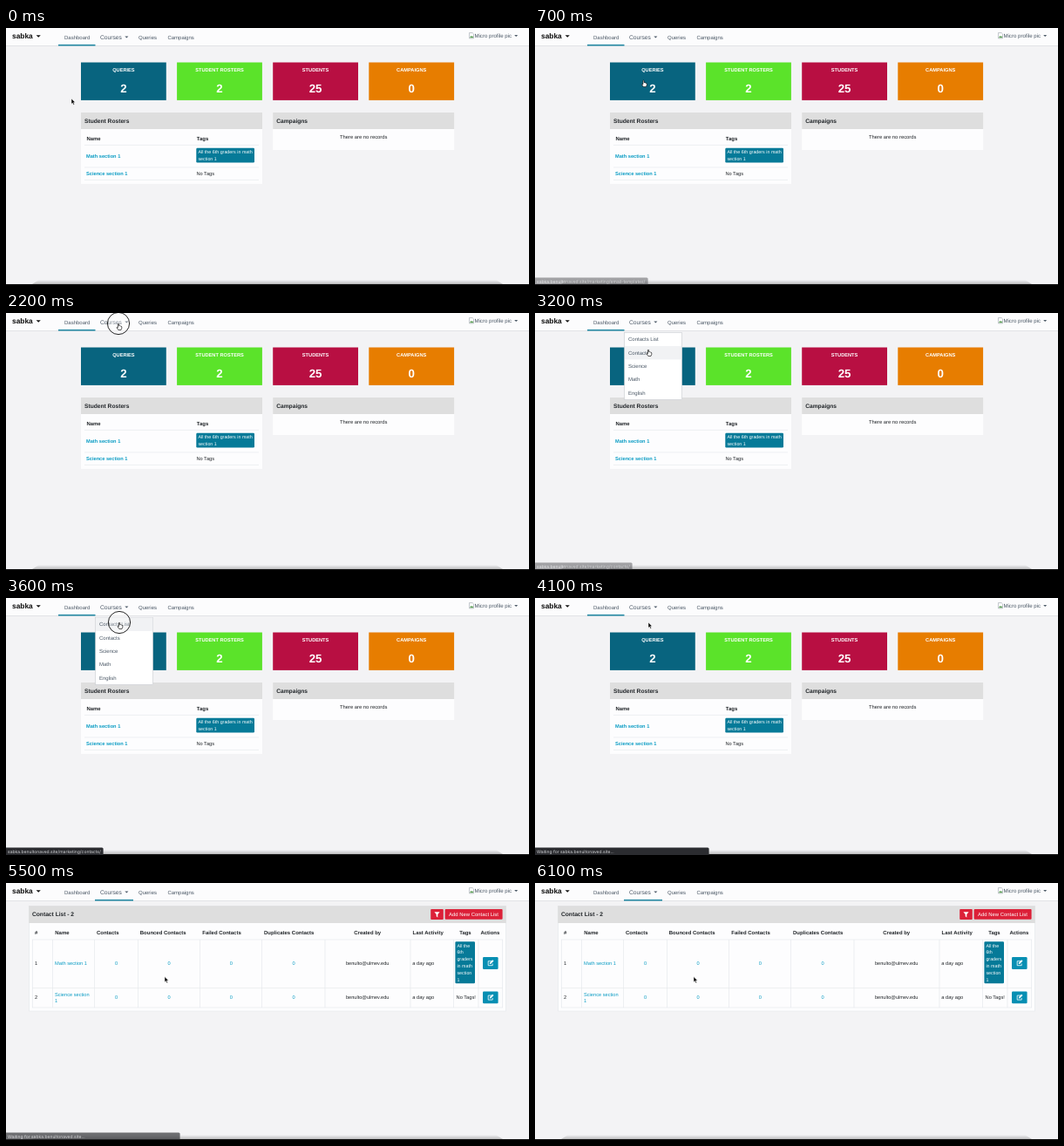
These frames come from a looping animation (600x295 px, 6400 ms). An HTML page:

```html
<!DOCTYPE html>
<html lang="en">
<head>
<meta charset="utf-8">
<title>Course dashboard</title>
<style>
  html, body { margin: 0; width: 100%; height: 100%; overflow: hidden; background: #f3f3f5; }
  svg { display: block; width: 600px; height: 295px; text-rendering: geometricPrecision; }
  text { font-family: "Liberation Sans", Arial, sans-serif; white-space: pre; }
</style>
</head>
<body>
<svg id="stage" viewBox="0 0 600 295"></svg>
<script>
const LOOP = 6400, STEP = 100;
const DARK = '#212529', NAV = '#4b5866', LINK = '#0a9cc4', TEAL = '#067a98', LINE = '#e3e6e9';
const HOST = 'sabka.benultonaved.site';

// Drawing helpers
const rect = (x, y, w, h, fill, more = '') =>
  `<rect x="${x}" y="${y}" width="${w}" height="${h}" fill="${fill}" ${more}/>`;
const text = (x, y, size, str, fill = DARK, more = '') =>
  `<text x="${x}" y="${y}" font-size="${size}" fill="${fill}" ${more}>${str}</text>`;
const path = (d, fill, more = '') => `<path d="${d}" fill="${fill}" ${more}/>`;
const group = (id, body, more = '') => `<g id="${id}" ${more}>${body}</g>`;
const caret = (x, y, w, fill) => path(`M${x} ${y}h${w}l${-w / 2} ${w / 2}z`, fill);
const lines = d => path(d, 'none', `stroke="${LINE}" stroke-width=".6"`);
const BOLD = 'font-weight="700"', MID = 'text-anchor="middle"';

function navBar() {
  return rect(0, 0, 600, 20.5, '#fcfcfd') + rect(0, 20.2, 600, .6, '#d5d7da') +
    text(7, 12.4, 8.4, 'sabka', '#111', BOLD) + caret(34.6, 8.2, 5.2, '#111') +
    rect(60, 18.9, 42.5, 1.6, '#2489a3', 'id="underline"') +
    text(67, 12.5, 6, 'Dashboard', NAV) +
    text(108, 12.9, 6.7, 'Courses', NAV) + caret(136.4, 9.4, 4, NAV) +
    text(152, 12.5, 6, 'Queries', NAV) + text(185.4, 12.5, 6, 'Campaigns', NAV) +
    path('M531.5 5.5h3.6l1.4 1.4v5h-5z', '#fff', 'stroke="#9aa3ab" stroke-width=".6"') +
    path('M532 11.3l1.6-2.6 1 1.2.8-.9.8 2.3z', '#5d9f57') +
    text(537.4, 11.2, 6.12, 'Micro profile pic', NAV) + caret(583.2, 8, 4, NAV);
}

function dashboard() {
  const cards = [['QUERIES', 2, '#08647f'], ['STUDENT ROSTERS', 2, '#5be32a'],
                 ['STUDENTS', 25, '#b80f42'], ['CAMPAIGNS', 0, '#e77d00']];
  const tiles = cards.map(([label, count, color], i) => {
    const x = 86 + i * 110.1;
    return rect(x, 39.5, 97.8, 43.4, color) +
      text(x + 48.9, 49.5, 5.67, label, '#fff', BOLD + MID) +
      text(x + 48.9, 74.2, 13.3, count, '#fff', BOLD + MID);
  }).join('');
  const panel = (x, bottom, title) => rect(x, 97, 208, bottom - 97, '#fdfdfe') +
    rect(x, 97, 208, 19, '#dedede') + text(x + 4, 108.7, 6.67, title, DARK, BOLD);
  return tiles + panel(86, 179, 'Student Rosters') + panel(306.2, 140, 'Campaigns') +
    lines('M90 134.4H290M90 160H290M90 174.4H290') +
    text(92.4, 129, 5.95, 'Name', DARK, BOLD) + text(218.8, 129, 5.95, 'Tags', DARK, BOLD) +
    text(92, 149, 5.67, 'Math section 1', LINK, BOLD) +
    text(92, 169, 5.67, 'Science section 1', LINK, BOLD) +
    rect(218.3, 137.8, 66.7, 16.6, TEAL, 'rx="1.2"') +
    text(220.4, 144, 5.35, 'All the 6th graders in math', '#fff') +
    text(220.4, 152, 5.35, 'section 1', '#fff') +
    text(218.4, 169, 5.67, 'No Tags') +
    text(410.2, 126.6, 5.83, 'There are no records', DARK, MID);
}

function contactLists() {
  const heads = [[33, '#'], [56.3, 'Name'], [104, 'Contacts'], [153.8, 'Bounced Contacts'],
    [225.3, 'Failed Contacts'], [296, 'Duplicates Contacts'], [399.3, 'Created by'],
    [466.5, 'Last Activity'], [520.2, 'Tags'], [544.4, 'Actions']];
  const columns = [30.5, 53.5, 101.5, 151.5, 222.5, 293.5, 366, 464, 513.5, 542, 569.5];
  const editIcon = (x, y) =>
    path(`M${x + 2.6} ${y - 1.9}h-5v5h5v-2.2`, 'none', 'stroke="#fff" stroke-width=".8"') +
    path(`M${x - .8} ${y + 1.4}l.2-1.5 3.2-3.2 1.3 1.3-3.2 3.2z`, '#fff');
  const row = (n, y, middle) =>
    text(33, y + 2, 5.67, n) +
    [126.6, 187, 258.3, 330].map(x => text(x, y + 2, 5.67, 0, LINK, MID)).join('') +
    text(414.7, y + 2, 5.6, 'benulto@ulmev.edu', DARK, MID) +
    text(466.3, y + 2, 5.67, 'a day ago') +
    rect(547, y - 6.9, 17.6, 13.8, '#078fb3', 'rx="1.2"') + editIcon(555.6, y - .4) + middle;
  const tag = ['All the', '6th', 'graders', 'in math', 'section', '1'];
  return rect(26.5, 26.5, 547, 120.5, '#fdfdfe', `stroke="${LINE}" stroke-width=".6"`) +
    rect(26.2, 26.2, 547.6, 19.8, '#dedede') +
    text(30, 37.9, 6.67, 'Contact List - 2', DARK, BOLD) +
    rect(487.2, 30, 14.6, 12, '#dc2038', 'rx="1"') +
    path('M491.4 33.2h6.2l-2.3 2.8v3.4l-1.6-1.2v-2.2z', '#fff') +
    rect(503.6, 30, 66, 11.8, '#dc2038', 'rx="1"') +
    text(536.5, 38, 5.93, 'Add New Contact List', '#fff', MID) +
    heads.map(([x, label]) => text(x, 58.8, 5.98, label, DARK, BOLD)).join('') +
    lines('M30 65H570M30 120.6H570M30 143H570' + columns.map(x => `M${x} 65V143`).join('')) +
    row(1, 92, text(56, 94, 5.7, 'Math section 1', LINK) +
      rect(515.4, 67.2, 22.6, 48, TEAL, 'rx="1.2"') +
      tag.map((word, i) => text(517.4, 73.6 + i * 7.8, 5.35, word, '#fff')).join('')) +
    row(2, 131.4, text(56, 129.6, 5.67, 'Science section', LINK) + text(56, 137.4, 5.67, 1, LINK) +
      text(527.7, 133.4, 5.67, 'No Tags!', DARK, MID));
}

function dropdown() {
  return rect(102.6, 22.5, 66, 77, '#fff', 'stroke="#c9ccd0" stroke-width=".6"') +
    rect(103, 0, 65.2, 15.4, '#f1f2f4', 'id="hover"') +
    ['Contacts List', 'Contacts', 'Science', 'Math', 'English']
      .map((item, i) => text(107, 32.2 + i * 15.4, 6, item, NAV)).join('');
}

const arrow = path('M0 0V6.2L1.4 5 2.4 7.2 3.5 6.7 2.5 4.6H4.4Z', '#000',
  'stroke="#fff" stroke-width=".5"');
const hand = path('M-.6 .5Q0-.3 .6.5V2.6Q1.4 2.2 1.7 2.9 2.5 2.6 2.8 3.3 3.7 3.1 3.8 4V5.4L3 7.4H-.2' +
  'L-2 4.8Q-2 3.8-.6 4.7Z', '#fff', 'stroke="#000" stroke-width=".65"');

document.getElementById('stage').innerHTML =
  `<defs><linearGradient id="shade" x2="0" y2="1"><stop stop-color="#000" stop-opacity="0"/>
   <stop offset="1" stop-color="#000" stop-opacity=".22"/></linearGradient></defs>` +
  rect(0, 0, 600, 295, '#f3f3f5') + navBar() +
  group('dashboard', dashboard()) + group('lists', contactLists()) + group('menu', dropdown()) +
  path('M30 294L38 289H562L570 294Z', 'url(#shade)') + rect(0, 294, 600, 1, '#111') +
  group('status', rect(-2, 286.5, 0, 10, '#2b2c30', 'id="statusBox" rx="1.5"') +
    text(2, 292.6, 5, '', '#d2d3d6', 'id="statusText" style="font-family:Inter,sans-serif"')) +
  group('pointer', `<circle id="ring" r="12.6" fill="#fff" fill-opacity=".3" stroke="#111" stroke-width=".9"/>` +
    group('arrow', arrow) + group('hand', hand));

const el = Object.fromEntries([...document.querySelectorAll('[id]')].map(node => [node.id, node]));
const show = (node, on) => node.setAttribute('display', on ? 'inline' : 'none');
const between = (t, a, b) => t >= a && t < b;
const clamp = v => Math.min(1, Math.max(0, v));

// Pointer moves: start, end, target x, target y
const MOVES = [[0, 500, 124.5, 60], [1300, 1500, 146, 92], [1700, 2200, 129, 12],
               [2400, 3000, 130, 42], [3200, 3500, 130, 28], [4800, 5400, 182, 107.5]];
function pointerAt(t) {
  let x = 75, y = 81;
  for (const [start, end, toX, toY] of MOVES) {
    const p = clamp((t - start) / (end - start)), eased = p * p * (3 - 2 * p);
    x += (toX - x) * eased;
    y += (toY - y) * eased;
  }
  return [x, y];
}

// Status bubbles: fade-in start, fade-out start, fade-out length, width, message
const STATUS = [[640, 1750, 100, 129.6, HOST + '/marketing/email-templates/'],
                [3140, 3700, 1, 111.6, HOST + '/marketing/contacts/'],
                [3540, 5400, 300, 199.6, `Waiting for ${HOST}...`]];
function drawStatus(t) {
  const current = STATUS.filter(([start, end, fade]) => between(t, start, end + fade))
    .filter(([start]) => start !== 3540 || t >= 3700)[0];
  show(el.status, current);
  if (!current) return;
  const [start, end, fade, width, message] = current;
  el.status.setAttribute('opacity', clamp((t - start) / 150) * clamp(1 - (t - end) / fade));
  el.statusBox.setAttribute('width', width + 2);
  el.statusText.textContent = message;
}

function draw(t) {
  const [x, y] = pointerAt(t);
  const loaded = t >= 4800, menuOpen = between(t, 2400, 3700);
  show(el.dashboard, !loaded);
  show(el.lists, loaded);
  el.underline.setAttribute('x', loaded ? 102 : 60);
  el.underline.setAttribute('width', loaded ? 44 : 42.5);

  show(el.menu, menuOpen);
  const item = Math.floor((y - 22.6) / 15.4);
  show(el.hover, menuOpen && item >= 0);
  el.hover.setAttribute('y', 22.6 + item * 15.4);

  const onCard = x > 86 && y > 39.5 && y < 83;
  const pointing = t < 3700 && (menuOpen || onCard || y < 20);
  el.pointer.setAttribute('transform', `translate(${x} ${y})`);
  show(el.hand, pointing);
  show(el.arrow, !pointing);
  show(el.ring, between(t, 2200, 2400) || between(t, 3600, 3700));
  drawStatus(t);
}

const began = performance.now();
function tick() {
  const t = (performance.now() - began) % LOOP;
  draw(Math.floor(t / STEP) * STEP);
  requestAnimationFrame(tick);
}
tick();
</script>
</body>
</html>
```
